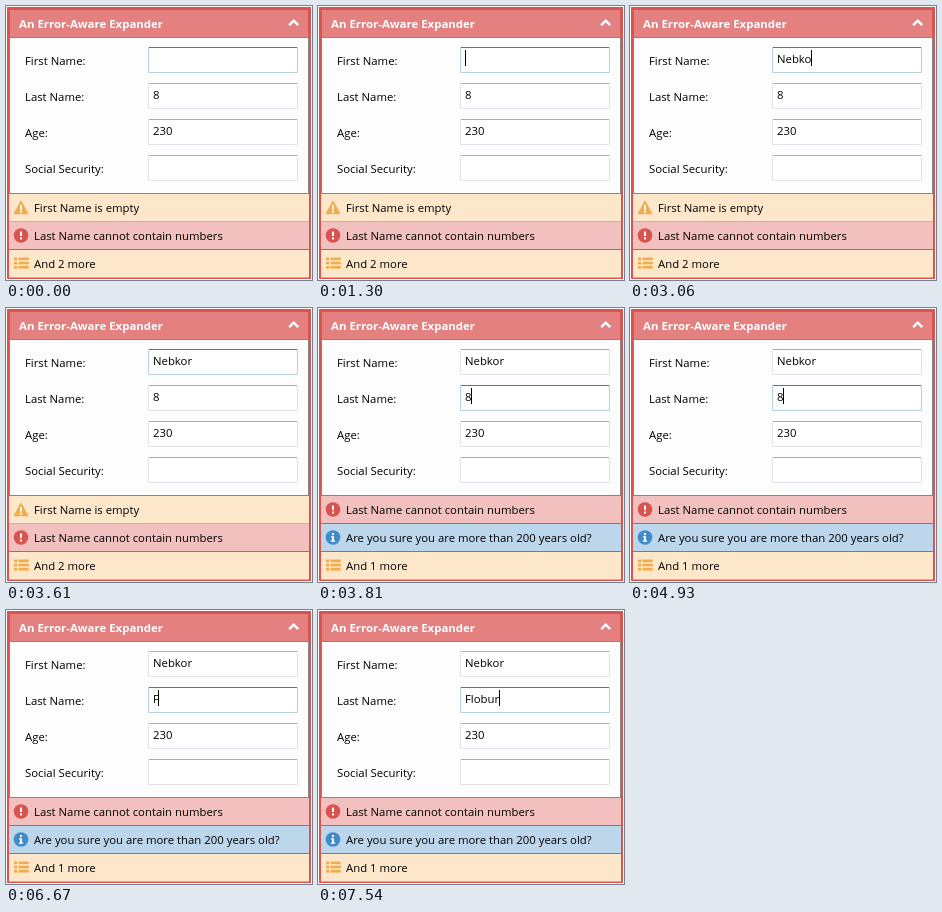
Recreate the animation shown at these times as an HTML page. Size 306x274 px, loop 8 s.

```html
<!DOCTYPE html>
<html lang="en">
<head>
<meta charset="utf-8">
<title>Error-aware expander</title>
<style>
html, body { margin: 0; width: 100%; height: 100%; overflow: hidden; background: #fff; }
svg { display: block; width: 306px; height: 274px; }
text { font: 11.35px "Open Sans", "Noto Sans", sans-serif; fill: #000; white-space: pre; }
.title { font-size: 11.45px; font-weight: 700; fill: #fff; }
</style>
</head>
<body>
<svg id="stage" viewBox="0 0 306 274"></svg>
<script>
const LOOP = 8000;
const RED = '#d9534f', ORANGE = '#f0ad4e', BLUE = '#428bca', GRAY = '#828790';
const FIRST = 'Nebkor', LAST = 'Flobur';
const stage = document.getElementById('stage');

function add(parent, tag, attrs, text) {
  const el = document.createElementNS('http://www.w3.org/2000/svg', tag);
  for (const key in attrs) el.setAttribute(key, attrs[key]);
  if (text !== undefined) el.textContent = text;
  parent.appendChild(el);
  return el;
}
const rect = (parent, x, y, width, height, fill) =>
  add(parent, 'rect', { x, y, width, height, fill });
const label = (parent, x, y, text) => add(parent, 'text', { x, y }, text);

// Frame, header and bordered content
rect(stage, 1, 1, 304, 272, RED);
rect(stage, 4, 4, 298, 27, '#e48080');
rect(stage, 3, 31, 300, 157, GRAY);
rect(stage, 4, 32, 298, 155, '#fdfdfd');
label(stage, 13, 22, 'An Error-Aware Expander').setAttribute('class', 'title');
add(stage, 'path', { d: 'M283.2 19.2 L287.7 14.6 L292.2 19.2', fill: 'none', stroke: '#fff', 'stroke-width': 2.4 });

// Form
const fields = ['First Name:', 'Last Name:', 'Age:', 'Social Security:'].map((name, i) => {
  const y = 41 + i * 36;
  label(stage, 19, y + 18, name);
  const side = rect(stage, 142, y, 150, 26);
  const top = rect(stage, 143, y, 148, 1);
  side.setAttribute('rx', 1);
  rect(stage, 143, y + 1, 148, 24, '#fff');
  return { y, side, top, text: label(stage, 147, y + 16, '') };
});
const caret = rect(stage, 147, 44, 1, 16, '#000');

// Message icons, drawn around (15, 14)
function mark(g, upper, lower) {
  rect(g, 14, upper, 2, 4.6, '#fff');
  rect(g, 14, lower, 2, 2, '#fff');
}
const icons = {
  warning(g) {
    add(g, 'path', { d: 'M15 8 L21.6 20 H8.4 Z', fill: ORANGE, stroke: ORANGE, 'stroke-width': 1.4, 'stroke-linejoin': 'round' });
    mark(g, 11.6, 17.2);
  },
  error(g) {
    add(g, 'circle', { cx: 15, cy: 14, r: 7.3, fill: RED });
    mark(g, 10, 16);
  },
  info(g) {
    add(g, 'circle', { cx: 15, cy: 14, r: 7.3, fill: BLUE });
    rect(g, 14, 9.6, 2, 2, '#fff');
    add(g, 'path', { d: 'M13 12.8 H16 V17 H17.2 V18.2 H12.8 V17 H14 V14 H13 Z', fill: '#fff' });
  },
  list(g) {
    for (const y of [8, 12.2, 16.4]) {
      rect(g, 8, y, 3.2, 2.7, ORANGE);
      rect(g, 12.5, y, 10.3, 2.7, ORANGE);
    }
  }
};
const tones = {
  warning: [ORANGE, '#fde7cb'],
  error: [RED, '#f1c0bf'],
  info: [BLUE, '#bcd6eb'],
  list: [ORANGE, '#fde7cb']
};

function messages(rows) {
  const group = add(stage, 'g', {});
  rows.forEach(([kind, text], i) => {
    const g = add(group, 'g', { transform: `translate(0 ${187 + i * 28})` });
    const [line, fill] = tones[kind];
    rect(g, 3, 1, 300, 27, fill);
    rect(g, 3, 28, 300, 1, line);
    icons[kind](add(g, 'g', { transform: 'translate(0 .5)' }));
    label(g, 28, 19, text);
  });
  return group;
}
const numbers = ['error', 'Last Name cannot contain numbers'];
const panels = [
  messages([['warning', 'First Name is empty'], numbers, ['list', 'And 2 more']]),
  messages([numbers, ['info', 'Are you sure you are more than 200 years old?'], ['list', 'And 1 more']])
];

// start ms, focused field, its text, caret visible
const steps = [
  [0, 0, '', 0], [230, 0, '', 1], [760, 0, '', 0], [1300, 0, '', 1], [1870, 0, '', 0],
  [2300, 0, FIRST.slice(0, 1), 1], [2840, 0, FIRST.slice(0, 2), 1],
  [3060, 0, FIRST.slice(0, 5), 1], [3260, 0, FIRST, 1], [3610, 0, FIRST, 0],
  [3810, 1, '8', 1], [4380, 1, '8', 0], [4930, 1, '8', 1], [5450, 1, '8', 0], [5900, 1, '8', 1],
  [6330, 1, '', 1], [6670, 1, LAST.slice(0, 1), 1], [6870, 1, LAST.slice(0, 3), 1],
  [7070, 1, LAST.slice(0, 5), 1], [7540, 1, LAST, 1]
];

function show([, focus, typed, blink]) {
  const values = focus ? [FIRST, typed, '230', ''] : [typed, '8', '230', ''];
  fields.forEach((field, i) => {
    field.text.textContent = values[i];
    field.side.setAttribute('fill', i === focus ? '#b5cfe7' : '#e2e3ea');
    field.top.setAttribute('fill', i === focus ? '#3d7bad' : '#abadb3');
  });
  const active = fields[focus];
  const width = typed ? active.text.getComputedTextLength() : 0;
  caret.setAttribute('x', Math.floor(147 + width));
  caret.setAttribute('y', active.y + 3);
  caret.setAttribute('visibility', blink ? 'visible' : 'hidden');
  panels.forEach((panel, i) => panel.setAttribute('visibility', i === focus ? 'visible' : 'hidden'));
}

const start = performance.now();
let current;
function tick() {
  const t = (performance.now() - start) % LOOP;
  const step = steps.filter(s => s[0] <= t).pop();
  if (step !== current) show(current = step);
  requestAnimationFrame(tick);
}
tick();
</script>
</body>
</html>
```
